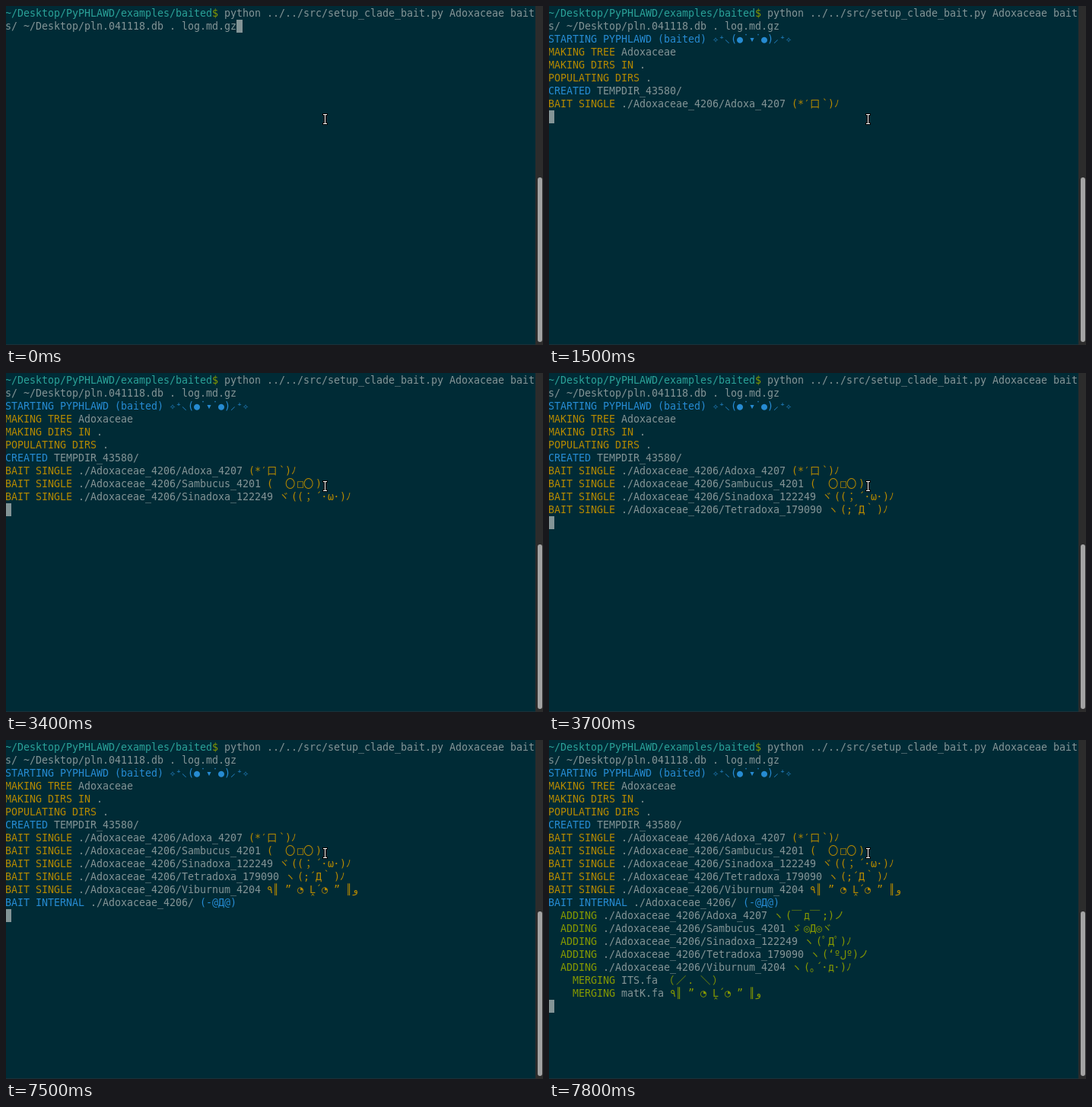
An HTML page with a canvas that plays this animation: 706x445 px, repeating every 8 s.

```html
<!DOCTYPE html>
<html lang="en">
<head>
<meta charset="utf-8">
<title>Terminal session</title>
<style>
  html, body { margin: 0; width: 100%; height: 100%; overflow: hidden; background: #002b36; }
  canvas { display: block; }
</style>
</head>
<body>
<canvas id="stage" width="706" height="445"></canvas>
<script>
const ctx = document.getElementById('stage').getContext('2d');
const LOOP = 8000;
const CELL = 8, ROW = 17, LEFT = -1, TOP = 1, ASCENT = 13;
const FG = '#839496', BLUE = '#268bd2', YELLOW = '#b58900', GREEN = '#859900', CYAN = '#2aa198';
const FONT = '13.333px "DejaVu Sans Mono", "DejaVu Sans", "Noto Sans CJK JP", "Noto Sans CJK", "Noto Sans", monospace';

const CLADE = './Adoxaceae_4206/';
const SHRUG = '٩║ ” ◔ Ḽ́ ◔ ” ║و';

// Each line: time it appears, then alternating colour and text.
const job = (time, color, label, path, face) =>
  [time, color, label + ' ', FG, path + ' ', color, face];
const bait = (time, taxon, face) => job(time, YELLOW, 'BAIT SINGLE', CLADE + taxon, face);
const add = (taxon, face) => job(7600, GREEN, '  ADDING', CLADE + taxon, face);
const merge = (time, file, face) => job(time, GREEN, '    MERGING', file, face);

const lines = [
  [0, CYAN, '~/Desktop/PyPHLAWD/examples/baited', GREEN, '$',
    FG, ' python ../../src/setup_clade_bait.py Adoxaceae bait'],
  [0, FG, 's/ ~/Desktop/pln.041118.db . log.md.gz'],
  [1200, BLUE, 'STARTING PYPHLAWD (baited) ✧⁺⸜(●˙▾˙●)⸝⁺✧'],
  [1200, YELLOW, 'MAKING TREE ', FG, 'Adoxaceae'],
  [1200, YELLOW, 'MAKING DIRS IN ', FG, '.'],
  [1200, YELLOW, 'POPULATING DIRS ', FG, '.'],
  [1500, BLUE, 'CREATED ', FG, 'TEMPDIR_43580/'],
  bait(1500, 'Adoxa_4207', '(*′口`)ﾉ'),
  bait(2000, 'Sambucus_4201', '(\u3000〇□〇)'),
  bait(3400, 'Sinadoxa_122249', 'ヾ((；´･ω･)ﾉ'),
  bait(3700, 'Tetradoxa_179090', 'ヽ(;´Д｀)ﾉ'),
  bait(3800, 'Viburnum_4204', SHRUG),
  job(7500, BLUE, 'BAIT INTERNAL', CLADE, '(-@Д@)'),
  add('Adoxa_4207', 'ヽ(￣д￣;)ノ'),
  add('Sambucus_4201', 'ゞ◎Д◎ヾ'),
  add('Sinadoxa_122249', 'ヽ(ﾟДﾟ)ﾉ'),
  add('Tetradoxa_179090', 'ヽ(‘ºلº)ノ'),
  add('Viburnum_4204', 'ヽ(｡´･д･)ﾉ'),
  merge(7600, 'ITS.fa', '（／．＼）'),
  merge(7800, 'matK.fa', SHRUG),
];

const isWide = ch => /[\u3000-\uff60\uffe3]/.test(ch);

function box(color, x, y, w, h) {
  ctx.fillStyle = color;
  ctx.fillRect(x, y, w, h);
}

// Draws one line on the cell grid and returns the column after it.
function drawLine([, ...runs], row) {
  let col = 0;
  for (let i = 0; i < runs.length; i += 2) {
    ctx.fillStyle = runs[i];
    for (const ch of runs[i + 1].match(/.\p{M}*/gu)) {
      ctx.fillText(ch, LEFT + col * CELL, TOP + row * ROW + ASCENT);
      col += isWide(ch) ? 2 : 1;
    }
  }
  return col;
}

function drawScrollbar() {
  box('#2c2c2c', 696, 0, 10, 445);
  ctx.fillStyle = '#a3a3a3';
  ctx.beginPath();
  ctx.roundRect(699, 225, 6, 216, 3);
  ctx.fill();
}

function drawPointer() {
  const parts = [[417, 142, 5, 1], [419, 142, 1, 13], [417, 154, 5, 1]];
  for (const [x, y, w, h] of parts) box('#000', x - 1, y - 1, w + 2, h + 2);
  for (const part of parts) box('#fff', ...part);
}

function draw(time) {
  box('#002b36', 0, 0, 706, 445);
  box('#1b3038', 0, 444, 696, 1);
  ctx.font = FONT;
  const shown = lines.filter(line => line[0] <= time);
  let endCol = 0;
  shown.forEach((line, row) => { endCol = drawLine(line, row); });

  const typing = shown.length === 2;
  const row = typing ? 1 : shown.length;
  box(FG, LEFT + (typing ? endCol * CELL : 0), TOP + row * ROW, CELL, ROW);
  drawScrollbar();
  drawPointer();
}

const start = performance.now();
function tick() {
  draw((performance.now() - start) % LOOP);
  requestAnimationFrame(tick);
}
tick();
</script>
</body>
</html>
```
